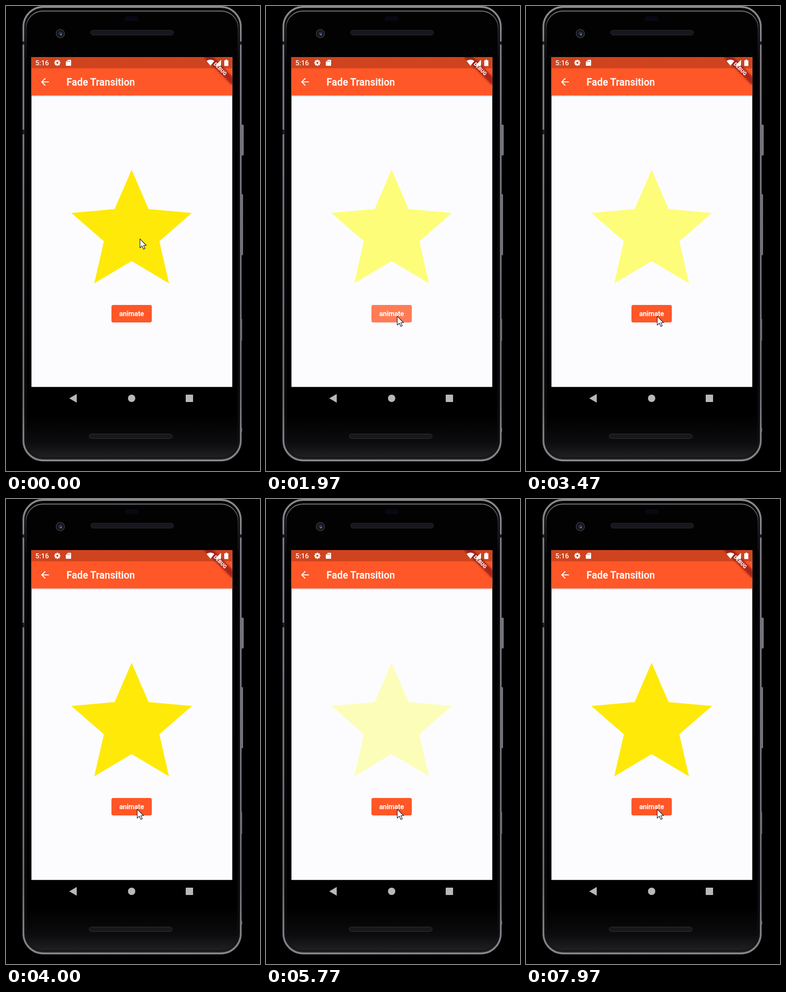
Animation, 554 px wide and 1011 px high, one loop 8000 ms. Source, as an HTML page:

```html
<!DOCTYPE html>
<html lang="en">
<head>
<meta charset="utf-8">
<title>Fade Transition</title>
<style>
  html, body { margin: 0; width: 100%; height: 100%; overflow: hidden; background: #000; }
  svg { display: block; width: 100%; height: 100%; }
  text { font-family: Roboto, sans-serif; font-weight: 500; fill: #fff; }
  .bold { stroke: #fff; stroke-width: .3; }
</style>
</head>
<body>
<svg viewBox="0 0 554 1011">
  <defs>
    <linearGradient id="edge" x1="0" y1="0" x2="0" y2="1">
      <stop offset="0" stop-color="#8b8b8e"/>
      <stop offset=".1" stop-color="#74757d"/>
      <stop offset=".85" stop-color="#66676e"/>
      <stop offset="1" stop-color="#85868b"/>
    </linearGradient>
    <linearGradient id="rim" x1="0" y1="0" x2="0" y2="1">
      <stop offset="0" stop-color="#77777d"/>
      <stop offset=".04" stop-color="#35353b"/>
      <stop offset=".12" stop-color="#0b0b0e"/>
      <stop offset="1" stop-color="#131315"/>
    </linearGradient>
    <linearGradient id="body" x1="0" y1="0" x2="0" y2="1">
      <stop offset="0" stop-color="#020203"/>
      <stop offset=".9" stop-color="#000"/>
      <stop offset=".96" stop-color="#0c0c0e"/>
      <stop offset="1" stop-color="#242425"/>
    </linearGradient>
    <linearGradient id="drop" x1="0" y1="0" x2="0" y2="1">
      <stop offset="0" stop-color="#000" stop-opacity=".2"/>
      <stop offset="1" stop-color="#000" stop-opacity="0"/>
    </linearGradient>
    <filter id="soft" x="-30%" y="-80%" width="160%" height="260%"><feGaussianBlur stdDeviation="2.5"/></filter>
    <clipPath id="screen"><rect x="55.500" y="111" width="438" height="717.300"/></clipPath>
    <clipPath id="button"><rect x="230" y="650" width="88" height="38" rx="4"/></clipPath>
  </defs>

  <rect width="554" height="1011"/>

  <!-- phone -->
  <g fill="#74757d">
    <rect x="512" y="258" width="6.500" height="67" rx="2"/>
    <rect x="511" y="409" width="6" height="133" rx="2"/>
    <rect x="511" y="680" width="4" height="48" rx="1"/>
    <rect x="511" y="917" width="4" height="9" rx="1"/>
  </g>
  <rect x="38" y="2" width="474" height="986" rx="43" fill="url(#body)" stroke="url(#edge)" stroke-width="4"/>
  <rect x="43.500" y="11" width="463" height="971" rx="37" fill="none" stroke="url(#rim)" stroke-width="2"/>
  <g fill="#1c1c21">
    <rect x="36" y="77" width="5" height="7"/>
    <rect x="509" y="77" width="5" height="7"/>
    <rect x="36" y="269" width="5" height="10"/>
  </g>
  <rect x="259" y="22" width="30" height="11" rx="5" fill="#080812"/>
  <rect x="184.500" y="52.500" width="181" height="11" rx="5.500" fill="#17171f" stroke="#26262b"/>
  <rect x="181.500" y="930.500" width="181" height="10" rx="5" fill="#17171c" stroke="#323235"/>
  <circle cx="118.500" cy="60" r="9" fill="#131316" stroke="#34343a" stroke-width="2"/>
  <circle cx="119" cy="60" r="4.500" fill="#25304f"/>
  <circle cx="120" cy="62" r="1.500" fill="#8592ad"/>

  <!-- app -->
  <g clip-path="url(#screen)">
    <rect x="55" y="111" width="439" height="718" fill="#fcfcff"/>
    <rect x="55" y="194" width="439" height="4" fill="url(#drop)"/>
    <rect x="55" y="111" width="439" height="83.500" fill="#ff5727"/>
    <rect x="55" y="111" width="439" height="24.500" fill="#cf441f"/>
    <path transform="translate(72.200 152.200) scale(1.066)" fill="#fff" d="M20 11H7.830l5.590-5.590L12 4l-8 8 8 8 1.410-1.410L7.830 13H20z"/>
    <text class="bold" x="132" y="173.200" font-size="21.300" letter-spacing=".16">Fade Transition</text>
    <g transform="translate(493 111) rotate(45)">
      <rect x="-43" y="30" width="86" height="13" fill="#000" opacity=".4" filter="url(#soft)"/>
      <rect x="-43" y="29.800" width="86" height="12.800" fill="#b71c1c" fill-opacity=".63"/>
      <text y="40.100" font-size="10.900" text-anchor="middle" style="font-weight:900">DEBUG</text>
    </g>

    <!-- status bar, above the banner -->
    <text x="64" y="129.300" font-size="15">5:16</text>
    <g fill="#fff">
      <g id="gear"><circle cx="112" cy="123.500" r="5"/></g>
      <path d="M135 117h6a1 1 0 0 1 1 1v11a1 1 0 0 1-1 1h-9.500a1 1 0 0 1-1-1v-7.500z"/>
      <path d="M437.500 119.500q8.500-6 17 0l-8.500 10.500z"/>
      <path d="M469 117v13h-13z"/>
      <path d="M479 116.500h3v1.500h2a1 1 0 0 1 1 1v10.500a1 1 0 0 1-1 1h-7a1 1 0 0 1-1-1v-10.500a1 1 0 0 1 1-1h2z"/>
    </g>
    <circle cx="112" cy="123.500" r="2.200" fill="#cf441f"/>
    <path d="M133.500 119v3M136 119v3M138.500 119v3" stroke="#cf441f" stroke-width=".9"/>

    <path id="star" d="M274 356L311 441.500 405.500 450 334.500 511.500 355.500 603 274 554.500 192.500 603 213.500 511.500 142.500 450 237 441.500z"/>

    <g clip-path="url(#button)">
      <rect x="230" y="650" width="88" height="38" fill="#ff5727"/>
      <circle id="ripple" cx="287" cy="672" fill="#fff"/>
    </g>
    <text class="bold" x="274" y="674" font-size="14.900" text-anchor="middle">animate</text>
  </g>

  <g fill="#b8b8b8">
    <path d="M138 853L154.300 843.500V862.500z"/>
    <circle cx="274" cy="853" r="8"/>
    <rect x="392" y="845" width="16" height="16" rx="1"/>
  </g>

  <path id="cursor" d="M0 0V19.500L4.600 15.300 7.800 22.300 11 20.900 7.900 14.200H13.800z" fill="#fff" stroke="#15152a" stroke-width="1.200" stroke-linejoin="round"/>
</svg>
<script>
const LOOP = 8000;
const $ = id => document.getElementById(id);
const setAll = (el, attrs) => {
  for (const k in attrs) el.setAttribute(k, attrs[k]);
};
const clamp = x => Math.max(0, Math.min(1, x));
const ramp = (t, a, b) => clamp((t - a) / (b - a));
const smooth = x => x * x * (3 - 2 * x);

// [time, opacity] of the star
const fade = [[1390, 1], [1970, .54], [2430, 0], [2960, 0], [3470, .54], [4000, 1],
  [4800, 1], [4970, .8], [5770, .28], [6040, 0], [6700, .61], [7040, 1]];

// [press, start of fade-out, gone]
const taps = [[1360, 1950, 2130], [2930, 3150, 3400], [4800, 5080, 5450], [6010, 6230, 6480]];

function follow(keys, t) {
  const i = keys.findIndex(k => k[0] > t);
  if (i < 0) return keys[keys.length - 1][1];
  if (i === 0) return keys[0][1];
  const [a, from] = keys[i - 1], [b, to] = keys[i];
  return from + (to - from) * ramp(t, a, b);
}

for (let i = 0; i < 8; i++) {
  const tooth = document.createElementNS('http://www.w3.org/2000/svg', 'rect');
  setAll(tooth, { x: 110.5, y: 116.8, width: 3, height: 4, transform: `rotate(${i * 45} 112 123.5)` });
  $('gear').append(tooth);
}

function draw(t) {
  // the golden tone turns lemon as the star fades
  const opacity = follow(fade, t);
  const green = 233 + 22 * clamp((1 - opacity) / .4);
  setAll($('star'), { opacity, fill: `rgb(255 ${green} 8)` });

  const move = smooth(ramp(t, 30, 1160));
  setAll($('cursor'), { transform: `translate(${292.2 - 6 * move} ${506.3 + 168 * move})` });

  const tap = taps.find(([a, , c]) => t >= a && t < c);
  const [press, out, gone] = tap || [0, 0, 1];
  const glow = tap ? ramp(t, press, press + 60) * (1 - ramp(t, out, gone)) : 0;
  setAll($('ripple'), { r: 16 + 48 * ramp(t, press, press + 240), opacity: .25 * glow });
}

const start = performance.now();
function tick() {
  draw((performance.now() - start) % LOOP);
  requestAnimationFrame(tick);
}
tick();
</script>
</body>
</html>
```
